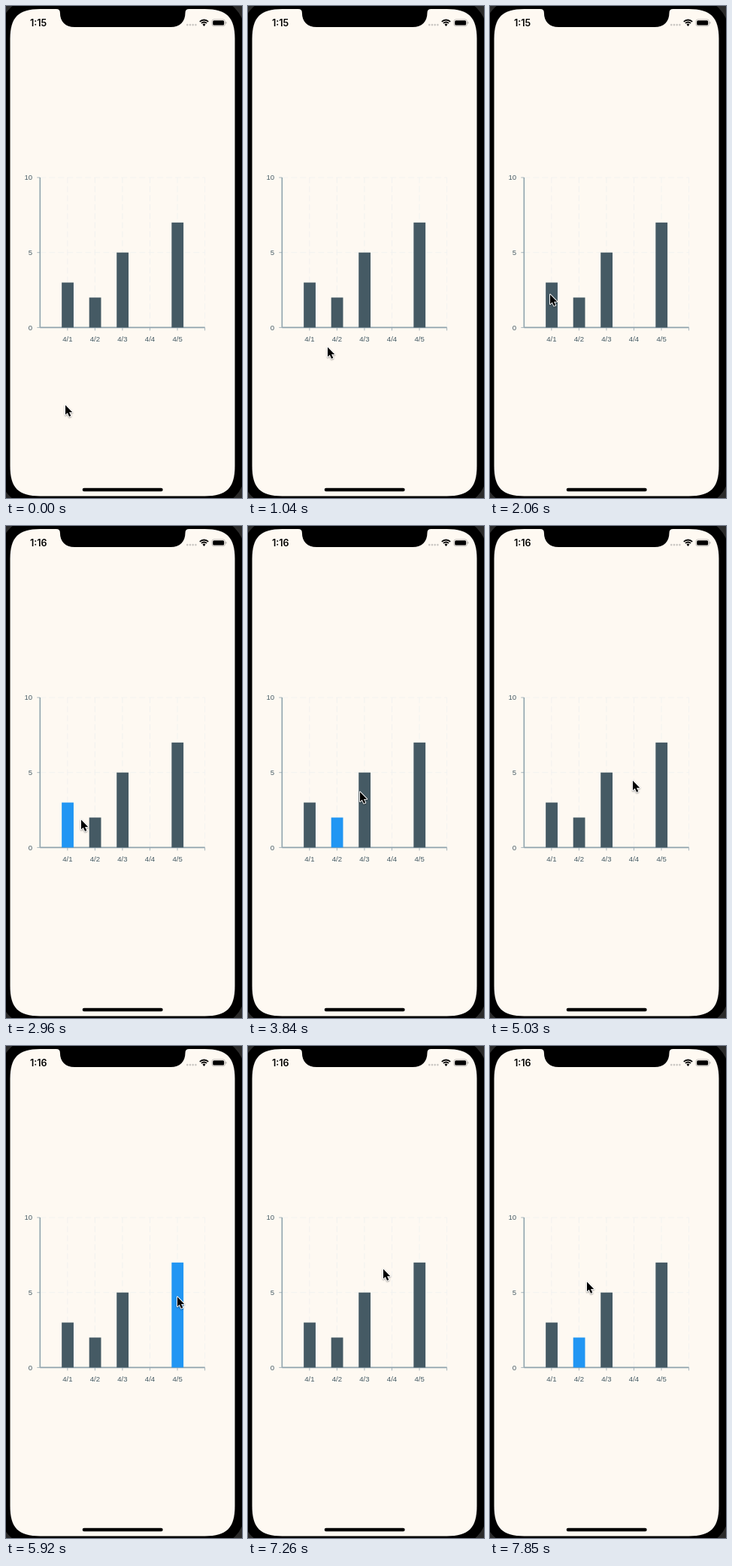
Recreate the animation shown at these times as an HTML page with a canvas. Size 314 px wide and 654 px high, loop 7990 ms.

```html
<!DOCTYPE html>
<html lang="en">
<head>
<meta charset="utf-8">
<title>Bar chart selection</title>
<style>
html, body { margin: 0; width: 100%; height: 100%; overflow: hidden; background: #000; }
canvas { display: block; width: 314px; height: 654px; }
</style>
</head>
<body>
<canvas id="stage"></canvas>
<script>
const W = 314, H = 654, LOOP = 7990, TICK = 148;
const CREAM = '#fef9f2', SLATE = '#455a64', BLUE = '#2196f3', AXIS = '#90a4ae', GRID = '#eff0ef';
const canvas = document.getElementById('stage');
const ctx = canvas.getContext('2d');
const dpr = window.devicePixelRatio || 1;
canvas.width = W * dpr;
canvas.height = H * dpr;

const chart = { left: 45.3, right: 264.6, top: 228, bottom: 427.4 };
const column = (chart.right - chart.left) / 6;
const values = [3, 2, 5, 0, 7];
const xAt = day => chart.left + day * column;
const yAt = value => chart.bottom - value * (chart.bottom - chart.top) / 10;
const dayAt = x => Math.round((x - chart.left) / column);

// Pointer journey; times are in ticks, and a tap selects the column under the pointer
const home = { x: 79, y: 530 };
const stops = [
  { x: 106, y: 453, leave: 3, arrive: 7 },
  { x: 89, y: 349, leave: 8, arrive: 12 },
  { x: 80, y: 383, leave: 12, arrive: 14, tap: 17 },
  { x: 119, y: 397, leave: 18, arrive: 22, tap: 23 },
  { x: 149, y: 353, leave: 24, arrive: 26, tap: 28 },
  { x: 190, y: 338, leave: 28, arrive: 34, tap: 34 },
  { x: 228, y: 333, leave: 35, arrive: 40, tap: 40 },
  { x: 180, y: 296, leave: 42, arrive: 48, tap: 48 },
  { x: 129, y: 313, leave: 49, arrive: 53, tap: 53 }
];

const ease = k => k * k * (3 - 2 * k);

function pointerAt(tick) {
  return stops.reduce((at, stop) => {
    const k = (tick - stop.leave) / (stop.arrive - stop.leave);
    const e = ease(Math.min(1, Math.max(0, k)));
    return { x: at.x + (stop.x - at.x) * e, y: at.y + (stop.y - at.y) * e };
  }, home);
}

function selectedAt(tick) {
  const tapped = stops.filter(stop => stop.tap <= tick).pop();
  return tapped ? dayAt(tapped.x) : 0;
}

function pill(x, y, w, h, r, color) {
  ctx.fillStyle = color;
  ctx.beginPath();
  ctx.roundRect(x, y, w, h, r);
  ctx.fill();
}

// Rectangle whose corners bend in gradually
function smoothRect(x, y, w, h, reach, color) {
  const near = reach * 0.273;
  ctx.fillStyle = color;
  ctx.beginPath();
  for (const [cx, cy, dx, dy] of [[x, y, 0, 1], [x + w, y, -1, 0], [x + w, y + h, 0, -1], [x, y + h, 1, 0]]) {
    ctx.lineTo(cx + dx * reach, cy + dy * reach);
    ctx.bezierCurveTo(cx + dx * near, cy + dy * near, cx + dy * near, cy - dx * near,
      cx + dy * reach, cy - dx * reach);
  }
  ctx.fill();
}

function line(x0, y0, x1, y1, width, color, dash = []) {
  ctx.strokeStyle = color;
  ctx.lineWidth = width;
  ctx.setLineDash(dash);
  ctx.beginPath();
  ctx.moveTo(x0, y0);
  ctx.lineTo(x1, y1);
  ctx.stroke();
  ctx.setLineDash([]);
}

function label(text, x, y, align) {
  ctx.font = '9.6px "Liberation Sans", Arial, sans-serif';
  ctx.fillStyle = SLATE;
  ctx.textAlign = align;
  ctx.fillText(text, x, y);
}

function drawNotch() {
  const middle = 155.2;
  ctx.fillStyle = '#000';
  for (const side of [-1, 1]) {
    const x = offset => middle + side * offset;
    ctx.beginPath();
    ctx.moveTo(middle, 3);
    ctx.lineTo(x(88.3), 3);
    ctx.lineTo(x(88.3), 4);
    ctx.quadraticCurveTo(x(83.3), 4, x(83.3), 9);
    ctx.bezierCurveTo(x(83.3), 21, x(76), 28, x(64), 28);
    ctx.lineTo(middle - side, 28);
    ctx.lineTo(middle - side, 3);
    ctx.fill();
  }
}

function drawPhone() {
  ctx.fillStyle = '#2b2b2b';
  ctx.fillRect(0, 0, W, H);
  pill(-8, -10, 326, 675, 45, '#000');
  smoothRect(5.5, 4, 299, 647.5, 40, CREAM);
  drawNotch();
  pill(101.7, 640.8, 107, 4.5, 2.2, '#000');
}

function drawStatus(clock) {
  ctx.font = '600 12.5px Inter, sans-serif';
  ctx.fillStyle = '#000';
  ctx.textAlign = 'left';
  ctx.fillText(clock, 32, 26.8);

  for (let i = 0; i < 4; i++) pill(240 + i * 3.7, 23.8, 2.6, 2.6, 1.3, '#c9c6c2');

  ctx.strokeStyle = '#000';
  ctx.lineWidth = 1.8;
  for (const radius of [8, 5]) {
    ctx.beginPath();
    ctx.arc(263.5, 26.5, radius, -Math.PI * 0.75, -Math.PI * 0.25);
    ctx.stroke();
  }
  ctx.fillStyle = '#000';
  ctx.beginPath();
  ctx.moveTo(263.5, 27);
  ctx.arc(263.5, 26.5, 2.8, -Math.PI * 0.75, -Math.PI * 0.25);
  ctx.fill();

  ctx.strokeStyle = '#b5b2ae';
  ctx.lineWidth = 0.8;
  ctx.beginPath();
  ctx.roundRect(273.9, 17.9, 17.6, 8.8, 2.6);
  ctx.stroke();
  pill(275.2, 19.2, 15, 6.2, 1.5, '#000');
  pill(292.3, 20.8, 1.1, 3, 0.5, '#b5b2ae');
}

function drawChart(selected) {
  const { left, right, top, bottom } = chart;
  for (let day = 1; day <= 6; day++) {
    const x = xAt(day);
    line(x, bottom, x, top, 0.8, GRID, [8, 4]);
    line(x, bottom, x, bottom + 4, 0.8, AXIS);
    if (day < 6) label('4/' + day, x, 446, 'center');
  }
  for (const value of [0, 5, 10]) {
    const y = yAt(value);
    if (value) line(left, y, right, y, 0.8, GRID, [8, 4]);
    line(left - 4, y, left, y, 0.8, AXIS);
    label(value, 35.2, y + 3.2, 'right');
  }
  line(left, top, left, bottom, 1.6, AXIS);
  line(left, bottom, right, bottom, 1.6, AXIS);
  values.forEach((value, i) => {
    ctx.fillStyle = selected === i + 1 ? BLUE : SLATE;
    ctx.fillRect(xAt(i + 1) - 7.7, yAt(value), 15.8, bottom - yAt(value));
  });
}

function drawPointer({ x, y }) {
  const arrow = new Path2D('M0 0V13.6L3 10.8L5.4 16.2L7.8 15.2L5.4 10H9.8Z');
  ctx.save();
  ctx.translate(Math.round(x), Math.round(y) + 0.5);
  ctx.scale(0.94, 0.94);
  ctx.lineJoin = 'round';
  ctx.lineWidth = 2;
  ctx.strokeStyle = '#fff';
  ctx.shadowColor = 'rgba(0,0,0,.4)';
  ctx.shadowBlur = 2 * dpr;
  ctx.shadowOffsetY = dpr;
  ctx.stroke(arrow);
  ctx.shadowColor = 'transparent';
  ctx.fillStyle = '#000';
  ctx.fill(arrow);
  ctx.restore();
}

function draw(now) {
  const tick = Math.floor((now % LOOP + 14) / TICK);
  ctx.setTransform(dpr, 0, 0, dpr, 0, 0);
  drawPhone();
  drawStatus(tick < 19 ? '1:15' : '1:16');
  drawChart(selectedAt(tick));
  drawPointer(pointerAt(tick));
}

const start = performance.now();
function loop() {
  draw(performance.now() - start);
  requestAnimationFrame(loop);
}
loop();
</script>
</body>
</html>
```
